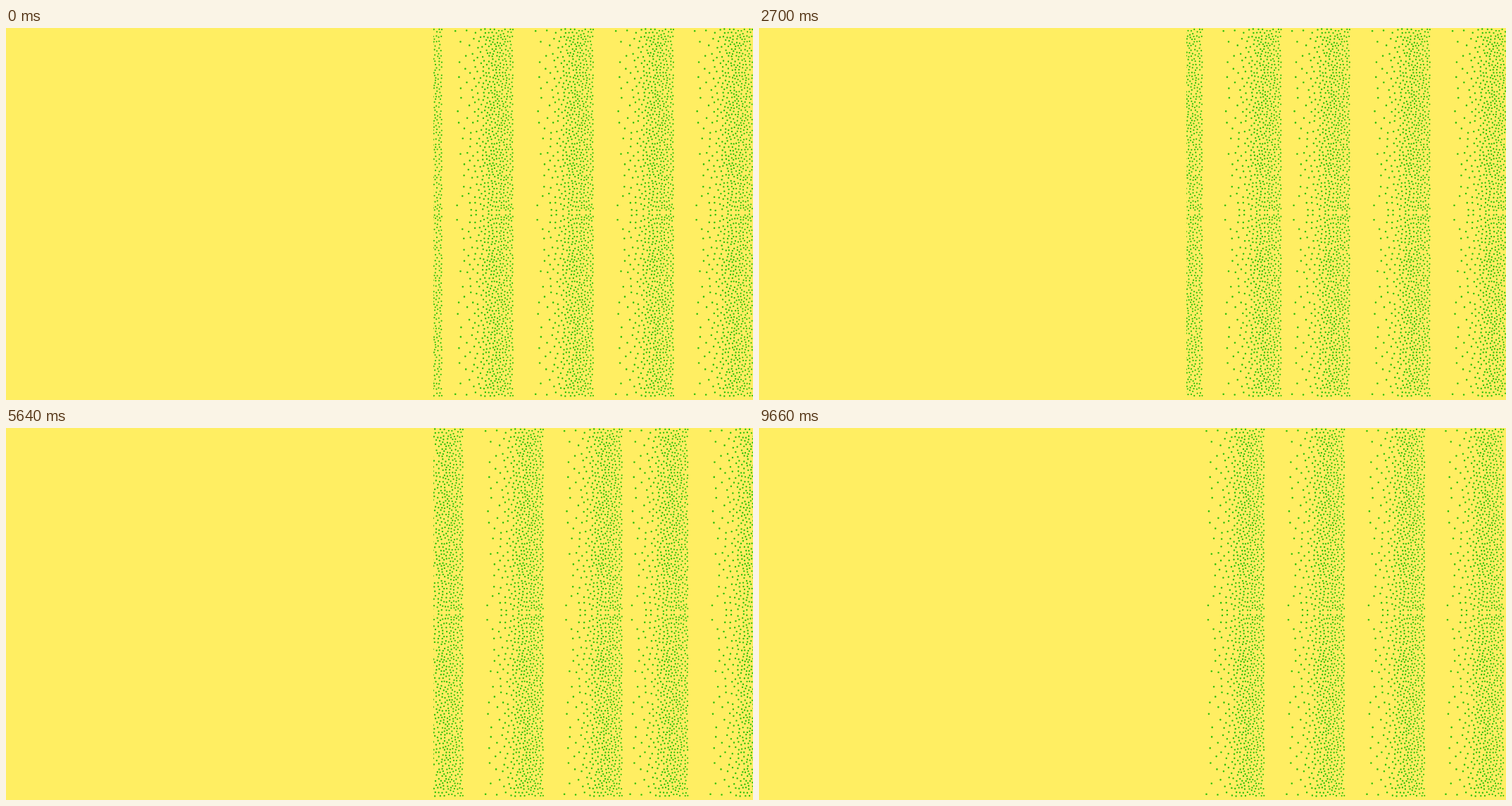
An HTML page for the animation above (9.72 s loop, 1061x528 px).

```html
<!DOCTYPE html>
<html lang="en">
<head>
<meta charset="utf-8">
<title>Drifting stipple bands</title>
<style>
  html, body { margin: 0; width: 100%; height: 100%; overflow: hidden; background: #ffee62; }
  svg { display: block; width: 100%; height: 100%; }
</style>
</head>
<body>
<svg viewBox="0 0 1061 528">
  <defs>
    <clipPath id="window"><rect x="607" width="454" height="524"/></clipPath>
    <path id="half"/>
    <g id="band">
      <use href="#half"/>
      <use href="#half" transform="matrix(1 0 0 -1 0 524)"/>
    </g>
    <g id="sheet">
      <use href="#band" x="637"/>
      <use href="#band" x="751"/>
      <use href="#band" x="865"/>
      <use href="#band" x="977"/>
    </g>
  </defs>
  <g clip-path="url(#window)" fill="#2fc00a">
    <use id="incoming" href="#sheet"/>
    <use id="outgoing" href="#sheet"/>
  </g>
</svg>
<script>
const LOOP = 9720, STEP = 60;
const WIDTH = 84, HALF = 262, TRIES = 7000;
const $ = id => document.getElementById(id);

let seed = 20117;
const random = () => (seed = (seed * 1664525 + 1013904223) % 4294967296) / 4294967296;

// Minimum distance between dots: wide on the left, tight from the middle on
const spacing = x => 3.5 + 12 * Math.max(0, 1 - x / 55) ** 1.6;

function scatter() {
  const dots = [];
  for (let i = 0; i < TRIES; i++) {
    const x = 1 + random() * (WIDTH - 2);
    const y = 1 + random() * (HALF - 2.5);
    const gap = spacing(x);
    if (dots.every(([a, b]) => Math.hypot(a - x, b - y) > gap)) dots.push([x, y]);
  }
  return dots;
}

function dotPath([x, y]) {
  const r = 1.35 - 0.25 * x / WIDTH;
  return `M${(x - r).toFixed(2)} ${y.toFixed(2)}a${r} ${r} 0 1 0 ${2 * r} 0a${r} ${r} 0 1 0 ${-2 * r} 0`;
}

$("half").setAttribute("d", scatter().map(dotPath).join(""));

const slide = (id, x) => $(id).setAttribute("transform", `translate(${x.toFixed(2)} 0)`);

function draw(time) {
  const p = time / LOOP;
  slide("incoming", 441 * (p - 1));
  slide("outgoing", 428 * p);
}

let last = -1;
const start = performance.now();
function tick() {
  const elapsed = (performance.now() - start) % LOOP;
  const time = Math.floor(elapsed / STEP) * STEP;
  if (time !== last) draw(last = time);
  requestAnimationFrame(tick);
}
tick();
</script>
</body>
</html>
```
